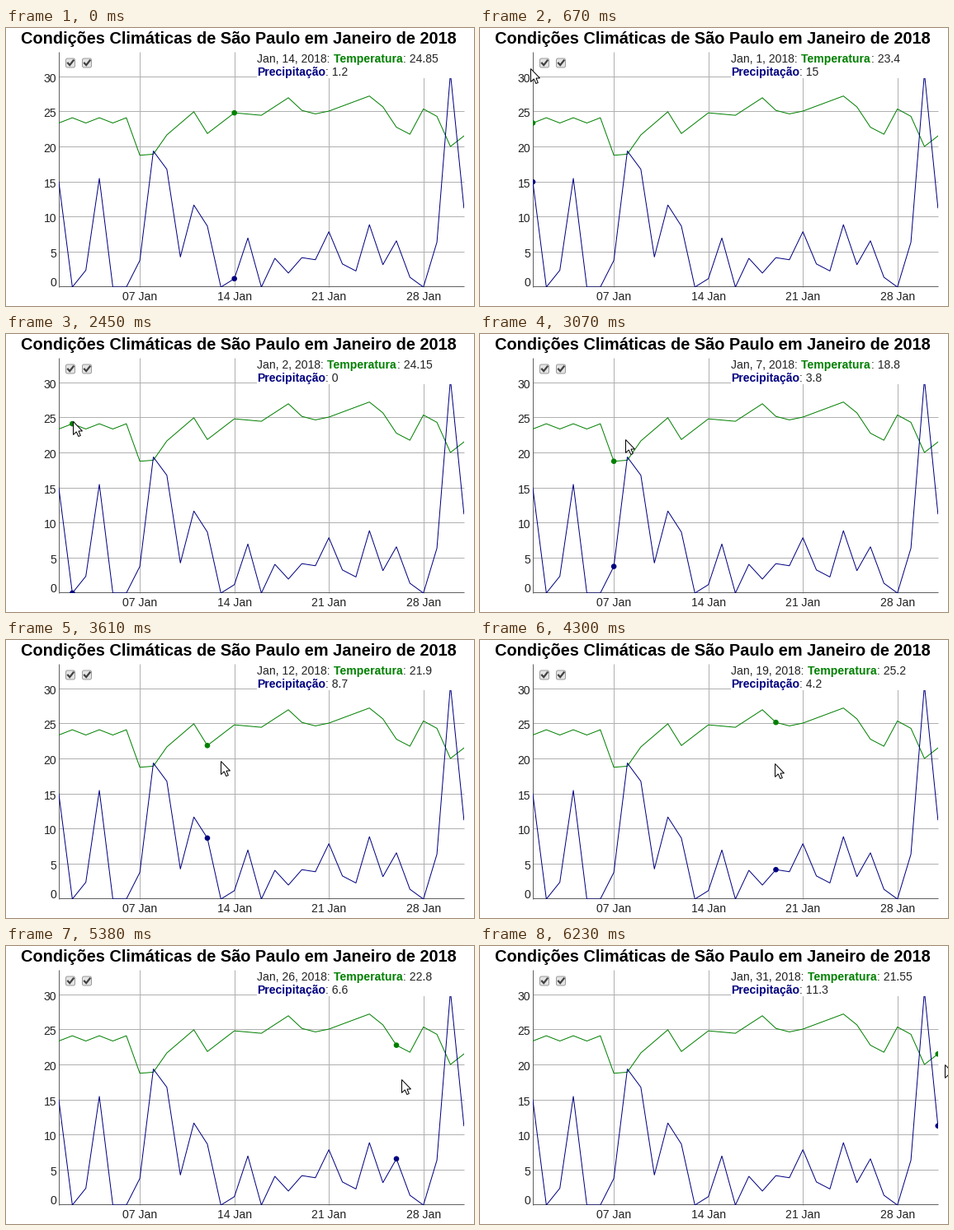
Recreate the animation shown at these times as a matplotlib script. Size 567 px wide and 338 px high, loop 6310 ms.

```python
import numpy as np
import matplotlib.pyplot as plt
from matplotlib.animation import FuncAnimation
from matplotlib.collections import LineCollection
from matplotlib.patches import Circle, FancyBboxPatch, Polygon, Rectangle

W, H, DPI = 567, 338, 64
LOOP, TICK = 6310, 10
PT = 72 / DPI  # points per pixel
LEFT, RIGHT, TOP, BOTTOM = 64, 555, 28, 315
DAY_W, UNIT_H = 16.36, 8.525
GREEN, NAVY, INK = "#008000", "#000080", "#222222"
LEGEND_X, EM = 304, 14
DAYS = np.arange(1, 32)
plt.rcParams["text.kerning_factor"] = 6  # plain, unkerned advances


def temperatures():
    """A small daily swing, then turning points joined by straight runs."""
    gap = np.nan
    swing = 23.775 + 0.375 * (-1.0) ** DAYS[:6]
    turns = [18.8, 18.95, 21.7, gap, 25, 21.9, gap, 24.85, gap, 24.5, gap,
             27, 25.2, 24.7, 25.1, gap, gap, 27.25, 25.7, 22.8, 21.8, 25.4,
             24.35, 20.05, 21.55]
    values = np.append(swing, turns)
    known = ~np.isnan(values)
    return np.interp(DAYS, DAYS[known], values[known])


def rainfall():
    """Rainy spells, each followed by one dry day."""
    spells = [[15], [2.4, 15.5], [], [3.8, 19.4, 16.8, 4.3, 11.7, 8.7],
              [1.2, 7], [4.1, 2, 4.2, 3.9, 7.9, 3.3, 2.3, 8.9, 3.2, 6.6, 1.4],
              [6.4, 30.5, 11.3]]
    return np.concatenate([spell + [0] for spell in spells])[:-1]


TEMP, RAIN = temperatures(), rainfall()

# Pointer sweep as (time, x, y); it rests on the checkbox first.
CHECK_SPOT = (78, 41)
SWEEP = np.array([(2140, *CHECK_SPOT), (2450, 82, 106), (3610, 261, 147),
                  (4200, 352, 150), (4300, 358, 150), (5380, 480, 162),
                  (5770, 532, 156), (6230, 564, 144)]).T
ENTER, ARRIVE, SWEEP_START = 270, 750, 1753.6
ARROW = np.array([(0, 0), (0, 16), (3.8, 12.4), (6.3, 18), (8.8, 17),
                  (6.5, 11.5), (11, 11.5)])


def day_x(day):
    return LEFT + (day - 1) * DAY_W


def value_y(value):
    return BOTTOM - value * UNIT_H


def nearest_day(x):
    return min(31, max(1, round((x - LEFT) / DAY_W) + 1))


def stepped(t, start, step):
    return start + (t - start) // step * step


def pointer(t):
    if t < ENTER:
        return None
    if t >= SWEEP_START:
        now = stepped(t, SWEEP_START, 77.025) + 5
        return np.array([np.interp(now, SWEEP[0], row) for row in SWEEP[1:]])
    now = stepped(t, ENTER, 80)
    # Loop down from the top edge, then glide onto the checkbox.
    p = min(1, (now - ENTER) / (ARRIVE - ENTER))
    spot = np.array([98 - 37 * np.sin(2.2 * p), 62 * np.sin(2.67 * p)])
    glide = np.clip((now - ARRIVE - 80) / 240, 0, 1)
    return spot + (np.array(CHECK_SPOT) - spot) * glide


def hovered_day(t):
    if t < 70:
        return 14
    if 430 <= t < ARRIVE:
        return nearest_day(pointer(t)[0])
    if t >= 2220:
        return nearest_day(pointer(t - 77)[0])  # highlight trails the pointer
    return None


fig = plt.figure(figsize=(W / DPI, H / DPI), dpi=DPI, facecolor="white")
ax = fig.add_axes([0, 0, 1, 1])
ax.set(xlim=(0, W), ylim=(H, 0))
ax.axis("off")


def label(x, y, text="", size=EM, color=INK, bold=False, ha="left"):
    return ax.text(x, y, text, fontsize=size * PT, color=color, ha=ha,
                   va="baseline", family="Liberation Sans", zorder=6,
                   weight="bold" if bold else "normal")


def segments(lines, color, z):
    ax.add_collection(LineCollection(lines, colors=color, linewidths=PT,
                                     zorder=z))


def series(values, color):
    line, = ax.plot(day_x(DAYS), value_y(values), color=color, lw=PT, zorder=3)
    dot = ax.add_patch(Circle((0, 0), 3.3, fc=color, ec="none", zorder=4))
    area = Rectangle((LEFT, TOP), RIGHT - LEFT, BOTTOM - TOP,
                     transform=ax.transData)
    for artist in (line, dot):
        artist.set_clip_path(area)
    return line, dot


def checkbox(x, y):
    ax.add_patch(FancyBboxPatch((x + 1.5, y + 1.5), 9, 9, fc="#e4e4e4",
                                ec="#9c9c9c", lw=PT, zorder=7,
                                boxstyle="round,pad=1,rounding_size=2"))
    mark, = ax.plot([x + 3, x + 5.2, x + 9.6], [y + 6.2, y + 8.6, y + 3],
                    color="#404040", lw=2.2 * PT, zorder=8,
                    solid_joinstyle="miter")
    return mark


def dash(color):
    return ax.add_patch(Rectangle((LEGEND_X, 36), 14, 2, fc=color, ec="none",
                                  zorder=6))


label(281.5, 19, "Condições Climáticas de São Paulo em Janeiro de 2018",
      20, "black", True, "center")

grid = []
for value in range(0, 31, 5):
    y = int(value_y(value))
    label(61, min(y + 7, BOTTOM - 1), str(value), ha="right")
    if value:
        grid.append([(LEFT, y), (RIGHT, y)])
for day in range(7, 31, 7):
    x = round(day_x(day))
    label(x, 331, f"{day:02d} Jan", ha="center")
    grid.append([(x, TOP + 1), (x, BOTTOM)])
segments(grid, "#b0b0b0", 1)
segments([[(LEFT, TOP + 1), (LEFT, BOTTOM)],
          [(LEFT, BOTTOM - 1), (RIGHT, BOTTOM - 1)]], "#616161", 2)

temp_line, temp_dot = series(TEMP, GREEN)
rain_line, rain_dot = series(RAIN, NAVY)

panel = ax.add_patch(Rectangle((LEGEND_X, TOP), RIGHT + 1 - LEGEND_X, 33,
                               fc="white", ec="none", zorder=5))
date = label(LEGEND_X, 42)
temp_name = label(0, 42, "Temperatura", color=GREEN, bold=True)
temp_value = label(0, 42)
rain_name = label(0, 58, "Precipitação", color=NAVY, bold=True)
rain_value = label(0, 58)
temp_dash, rain_dash = dash(GREEN), dash(NAVY)
TEMP_W, RAIN_W = 6.057 * EM, 5.947 * EM

temp_check = checkbox(72, 36.5)
checkbox(92, 36.5)
arrow = ax.add_patch(Polygon(ARROW, fc="white", ec="black", lw=PT, zorder=9))


def show_values(day):
    temp, rain = TEMP[day - 1], RAIN[day - 1]
    x = LEGEND_X + EM * (5.504 + 0.556 * len(str(day)))
    date.set_text(f"Jan, {day}, 2018:")
    temp_name.set_x(x)
    temp_value.set_text(f": {round(temp, 2):g}")
    temp_value.set_x(x + TEMP_W)
    rain_name.set_position((LEGEND_X, 58))
    rain_value.set_text(f": {rain:g}")
    rain_value.set_x(LEGEND_X + RAIN_W)
    temp_dot.center = day_x(day), value_y(temp)
    rain_dot.center = day_x(day), value_y(rain)


def show_keys(with_temp):
    x = LEGEND_X
    if with_temp:
        temp_name.set_x(x + 18)
        x += 18 + TEMP_W + 4
    rain_dash.set_x(round(x))
    rain_name.set_position((x + 18, 42))


def update(frame):
    t = frame * TICK
    day = hovered_day(t)
    picked = day is not None
    with_temp = not 1280 <= t < 1840

    if picked:
        show_values(day)
    else:
        show_keys(with_temp)
    for artist in (date, temp_value, rain_value, temp_dot, rain_dot):
        artist.set_visible(picked)
    panel.set_height(33 if picked else 17)
    rain_dash.set_visible(not picked)
    temp_dash.set_visible(with_temp and not picked)
    temp_name.set_visible(with_temp)
    temp_line.set_visible(with_temp)
    temp_check.set_visible(not 1210 <= t < 1760)

    spot = pointer(t)
    arrow.set_visible(spot is not None)
    if spot is not None:
        arrow.set_xy(ARROW + np.round(spot) + (-0.5, 0.5))
    return []


anim = FuncAnimation(fig, update, frames=LOOP // TICK, interval=TICK,
                     repeat=True, cache_frame_data=False)
plt.show()
```
